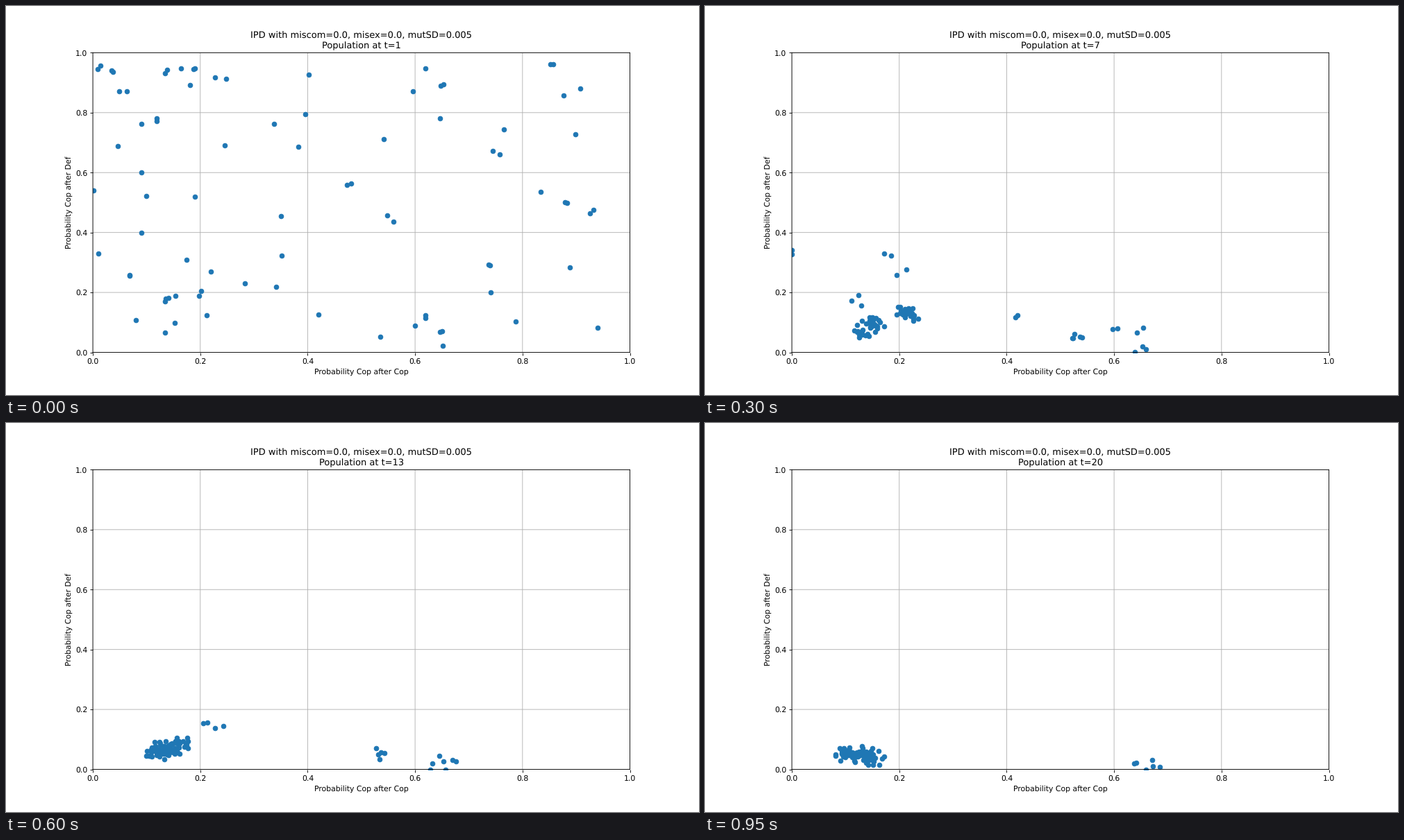
These frames come from a looping animation (998x561 px, 1050 ms). A matplotlib script:

```python
import numpy as np
import matplotlib.pyplot as plt
from matplotlib.animation import FuncAnimation

WIDTH, HEIGHT, DPI = 998, 561, 78
LAST_T = 20
MUTATION_SD = 0.005

rng = np.random.default_rng(12)
plt.rcParams.update({"font.family": "DejaVu Sans",
                     "text.hinting": "none",
                     "path.snap": False})


def wandering(n):
    """Slowly changing standard normal offsets, indexed by [t, member]."""
    z = rng.normal(size=(LAST_T + 1, n, 2))
    for t in range(1, LAST_T + 1):
        z[t] = 0.75 * z[t - 1] + 0.66 * z[t]
    return np.clip(z, -2, 2)


def lineage(start, end, peak, peak_t, last):
    """One founder whose offspring multiply, mutate, drift and die out."""
    start, end = np.array(start), np.array(end)
    offsets = wandering(peak)

    def members(t):
        if t <= peak_t:
            size = 1 + (peak - 1) * ((t - 1) / (peak_t - 1)) ** 2
        else:
            size = peak * (last + 1 - t) / (last + 1 - peak_t)
        n = int(np.ceil(size)) if t <= last else 0
        center = start + (end - start) * ((t - 1) / (LAST_T - 1)) ** 2
        spread = MUTATION_SD * np.sqrt(min(t - 1, 8))
        return center + spread * offsets[t, :n]

    return members


def stray(x, y):
    """A doomed strategy: the more it cooperates, the sooner it goes."""
    last = round(5 - 3.5 * y - x + rng.normal(0, 0.7))
    return lineage((x, y), (x, y), 1, 5, np.clip(last, 1, 4))


def contender(x, y):
    """A strategy that spreads for a while before it is displaced."""
    return lineage((x, y), (x, y), 5, 5, round(10 - 9 * y - 4 * x))


founders = rng.random((52, 2))
founders[:, 0] **= 1.2
siblings = founders[::3] + rng.normal(0, 0.008, founders[::3].shape)

contenders = [(0.01, 0.33), (0.09, 0.40), (0.19, 0.52), (0.135, 0.17),
              (0.175, 0.31), (0.22, 0.27), (0.42, 0.125), (0.60, 0.09),
              (0.65, 0.07)]

groups = [stray(x, y) for x, y in np.vstack([founders, siblings])]
groups += [contender(x, y) for x, y in contenders]
groups += [
    lineage((0.134, 0.067), (0.110, 0.055), peak=45, peak_t=13, last=60),
    lineage((0.152, 0.098), (0.144, 0.043), peak=40, peak_t=9, last=90),
    lineage((0.212, 0.123), (0.230, 0.160), peak=24, peak_t=7, last=13),
    lineage((0.535, 0.052), (0.533, 0.040), peak=8, peak_t=9, last=18),
    lineage((0.652, 0.023), (0.662, 0.005), peak=7, peak_t=13, last=40),
]


def population(t):
    points = np.concatenate([members(t) for members in groups])
    return np.clip(points, 0, 1).T


# The tiny surplus guards against the pixel size being rounded down.
fig = plt.figure(figsize=((WIDTH + 0.01) / DPI, (HEIGHT + 0.01) / DPI), dpi=DPI)
ax = fig.add_axes([0.1253, 0.1096, 0.775, 0.7703])
ax.set(xlim=(0, 1), ylim=(0, 1),
       xlabel="Probability Cop after Cop", ylabel="Probability Cop after Def")
ax.grid(True)
dots, = ax.plot([], [], "o", color="C0")


def update(frame):
    t = min(frame + 1, LAST_T)
    dots.set_data(*population(t))
    ax.set_title("IPD with miscom=0.0, misex=0.0, mutSD=0.005\n"
                 f"Population at t={t}")
    return [dots]


anim = FuncAnimation(fig, update, frames=21, interval=50, repeat=True)
plt.show()
```
